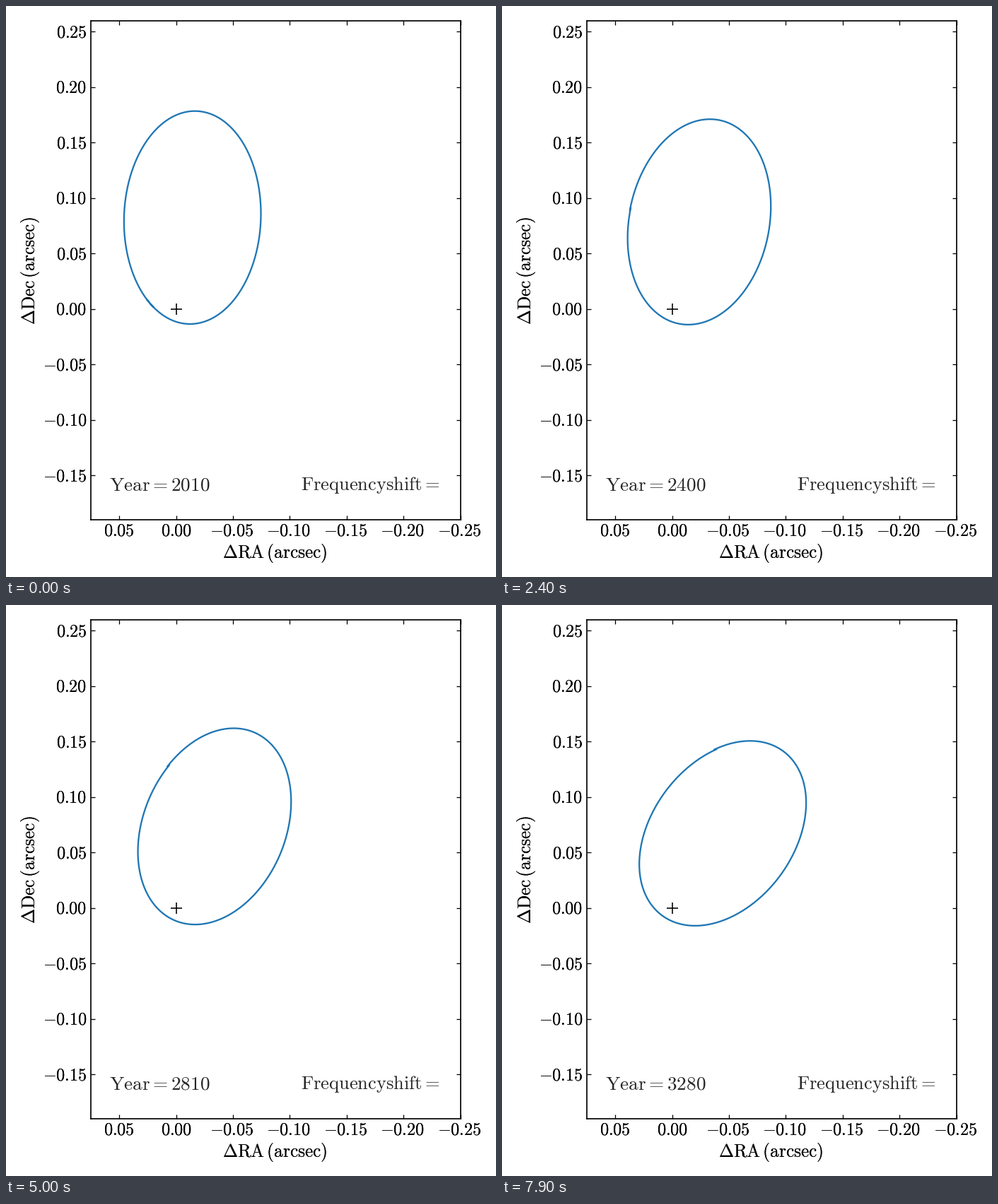
A matplotlib script that plays this animation: 693 px wide and 808 px high, repeating every 8 s.

```python
import matplotlib.pyplot as plt
import numpy as np
from matplotlib.animation import FuncAnimation

W, H, DPI = 693, 808, 64
PT = 72 / DPI  # points per pixel
FRAMES, INTERVAL = 80, 100

plt.rcParams["mathtext.fontset"] = "cm"

# Projected orbit: periapsis and in-plane normal directions (RA, Dec)
ECC = 0.885
B = np.sqrt(1 - ECC**2)
P = np.array([0.0162, -0.0933])
Q = np.array([0.1245, 0.0483])
PRECESSION = np.radians(0.2043)  # per revolution
DRIFT, START = 0.02, 0.045       # mean anomaly at which a trace starts
YEAR0, PERIOD = 2010.4, 16.05


def eccentric_anomaly(mean):
    e = np.pi
    for _ in range(30):
        e -= (e - ECC * np.sin(e) - mean) / (1 - ECC * np.cos(e))
    return e


def orbit(n):
    """Trace of revolution n, with the periapsis advancing along the way."""
    first = eccentric_anomaly(START + DRIFT * n)
    last = eccentric_anomaly(START + DRIFT * (n + 1)) + 2 * np.pi
    e = np.linspace(first, last, 500)
    beta = ECC / (1 + B)
    true = e + 2 * np.arctan(beta * np.sin(e) / (1 - beta * np.cos(e)))
    turn = PRECESSION * (n + true / (2 * np.pi) - 0.5)
    u, v = np.cos(e) - ECC, B * np.sin(e)
    cu = u * np.cos(turn) - v * np.sin(turn)
    cv = u * np.sin(turn) + v * np.cos(turn)
    return P[0] * cu + Q[0] * cv, P[1] * cu + Q[1] * cv


fig = plt.figure(figsize=(W / DPI, H / DPI), dpi=DPI, facecolor="white")


def label(x, y, text, size, ha="center", rotation=0, color="black"):
    return fig.text(x / W, 1 - y / H, f"${text}$", fontsize=size * PT, ha=ha,
                    va="baseline", rotation=rotation, rotation_mode="anchor",
                    color=color)


def heavy_label(*args, **kwargs):
    """Overprint the text once so its thin strokes come out darker."""
    for _ in range(2):
        label(*args, **kwargs)


left, right, top, bottom = 120, 642.7, 20.8, 727.2
ax = fig.add_axes([left / W, 1 - bottom / H, (right - left) / W, (bottom - top) / H])
ax.set(xlim=(0.075, -0.25), ylim=(-0.19, 0.26))
xticks = np.arange(0.05, -0.26, -0.05)
yticks = np.arange(-0.15, 0.26, 0.05)
ax.set_xticks(xticks)
ax.set_yticks(yticks)
ax.tick_params(direction="in", length=6 * PT, width=1.3 * PT, top=True,
               right=True, labelbottom=False, labelleft=False)
for spine in ax.spines.values():
    spine.set_linewidth(1.7 * PT)


def number(v):
    return f"{round(v, 2) + 0.0:.2f}"


for v in xticks:
    x = left + (0.075 - v) / 0.325 * (right - left)
    hang = 1.8 if v < -0.01 else 0  # minus sign hangs to the left
    heavy_label(x - hang, 749, number(v), 24.2)
for v in yticks:
    y = top + (0.26 - v) / 0.45 * (bottom - top)
    heavy_label(114.5, y + 8, number(v), 24.2, ha="right")

heavy_label(380.5, 780.5, r"\Delta\mathrm{RA}\,\mathrm{(arcsec)}", 25.4)
heavy_label(41.5, 374.5, r"\Delta\mathrm{Dec}\,\mathrm{(arcsec)}", 25.4, rotation=90)
note = dict(ha="left", color="0.15")
label(417, 685, r"\mathrm{Frequencyshift} =", 26.5, **note)
year = label(146.5, 685, "", 27.2, **note)

ax.plot(0, 0, "+", color="black", ms=16 * PT, mew=1.6 * PT)
curve, = ax.plot([], [], color="#1f77b4", lw=2.3 * PT)


def update(n):
    curve.set_data(*orbit(n))
    rounded = 10 * round((YEAR0 + PERIOD * n) / 10)
    year.set_text(rf"$\mathrm{{Year}} = {rounded}$")
    return curve, year


anim = FuncAnimation(fig, update, frames=FRAMES, interval=INTERVAL,
                     repeat=True, repeat_delay=0)
plt.show()
```
